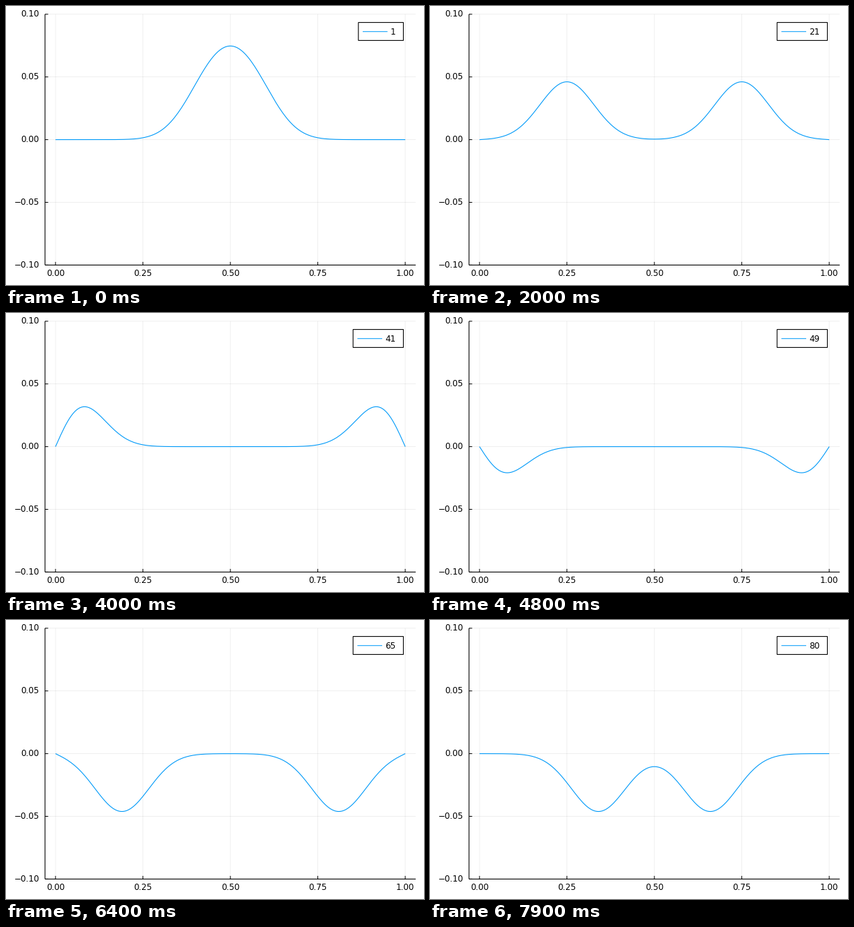
A matplotlib script that plays this animation: 600 by 400 pixels, repeating every 8 s.

```python
import math

import numpy as np
import matplotlib.pyplot as plt
from matplotlib.animation import FuncAnimation
from matplotlib.patches import Rectangle

W, H, DPI = 600, 400, 100
PT = 72 / DPI  # points per pixel
FRAMES, INTERVAL = 80, 100

LEFT, RIGHT, TOP, BOTTOM = 56.0, 588.1, 11.8, 371.4
BLUE = "#009af9"
FONT = 12
DIGIT = 0.636 * FONT  # advance width of one digit
BASE = 3.4            # from a label's middle to its baseline

plt.rcParams["font.family"] = "DejaVu Sans"

fig = plt.figure(figsize=(W / DPI, H / DPI), dpi=DPI, facecolor="white")
ax = fig.add_axes([0, 0, 1, 1])
ax.set_xlim(0, W)
ax.set_ylim(H, 0)
ax.axis("off")

erf = np.vectorize(math.erf)


def px(x):
    return LEFT + (x + 0.03) / 1.06 * (RIGHT - LEFT)


def py(y):
    return TOP + (0.1 - y) / 0.2 * (BOTTOM - TOP)


def line(xs, ys, color="black", width=1.0, **kw):
    return ax.plot(xs, ys, color=color, lw=width * PT, snap=False,
                   solid_capstyle="butt", **kw)[0]


def label(x, mid, text, ha, **kw):
    return ax.text(x, mid + BASE, text, ha=ha, va="baseline",
                   fontsize=FONT * PT, color="black", **kw)


def pulse(d):
    """Gaussian 0.05 exp(-100 d^2) averaged over d - 0.05 .. d + 0.05."""
    return math.sqrt(math.pi) / 40 * (erf(10 * d + 0.5) - erf(10 * d - 0.5))


def wave(x, shift):
    """Two travelling pulses, mirrored with a sign flip at the fixed ends."""
    u = np.zeros_like(x)
    for start in (0.5 - shift, 0.5 + shift):
        for k in (-2, 0, 2):
            u += pulse(x - start - k) - pulse(x + start - k)
    return u


def draw_axes():
    for x in np.linspace(0, 1, 5):
        line([px(x)] * 2, [TOP, BOTTOM], width=0.6, alpha=0.1, zorder=1)
        line([px(x)] * 2, [BOTTOM, BOTTOM - 4.5], zorder=3)
        label(px(x), 383.2, f"{x:.2f}", "center")
    for y in (-0.1, -0.05, 0, 0.05, 0.1):
        line([LEFT, RIGHT], [py(y)] * 2, width=0.6, alpha=0.1, zorder=1)
        line([LEFT, LEFT + 4.5], [py(y)] * 2, zorder=3)
        label(48, py(y), f"{y:.2f}".replace("-", "\u2212"), "right")
    line([LEFT, LEFT], [TOP, BOTTOM], width=1.1, zorder=3)
    line([LEFT, RIGHT], [BOTTOM, BOTTOM], width=1.1, zorder=3)


draw_axes()
xs = np.linspace(0, 1, 201)
curve = line(px(xs), py(0 * xs), BLUE, 1.1, zorder=4)
box = ax.add_patch(Rectangle((506, 23.6), 64.4, 25.8, facecolor="white",
                             edgecolor="black", lw=1.1 * PT, snap=False,
                             zorder=5))
key = line([], [], BLUE, zorder=6)
count = label(551.8, 37.8, "1", "left", zorder=6)


def update(i):
    n = i + 1
    curve.set_ydata(py(wave(xs, 0.04 + 0.01 * n)))
    text_x = 559.45 - DIGIT * len(str(n))
    box.set_x(text_x - 46)
    box.set_width(570.4 - box.get_x())
    key.set_data([text_x - 39.8, text_x - 4.2], [36.7, 36.7])
    count.set_x(text_x)
    count.set_text(str(n))
    return curve, box, key, count


anim = FuncAnimation(fig, update, frames=FRAMES, interval=INTERVAL,
                     init_func=lambda: update(0), repeat=True, repeat_delay=0)
plt.show()
```
